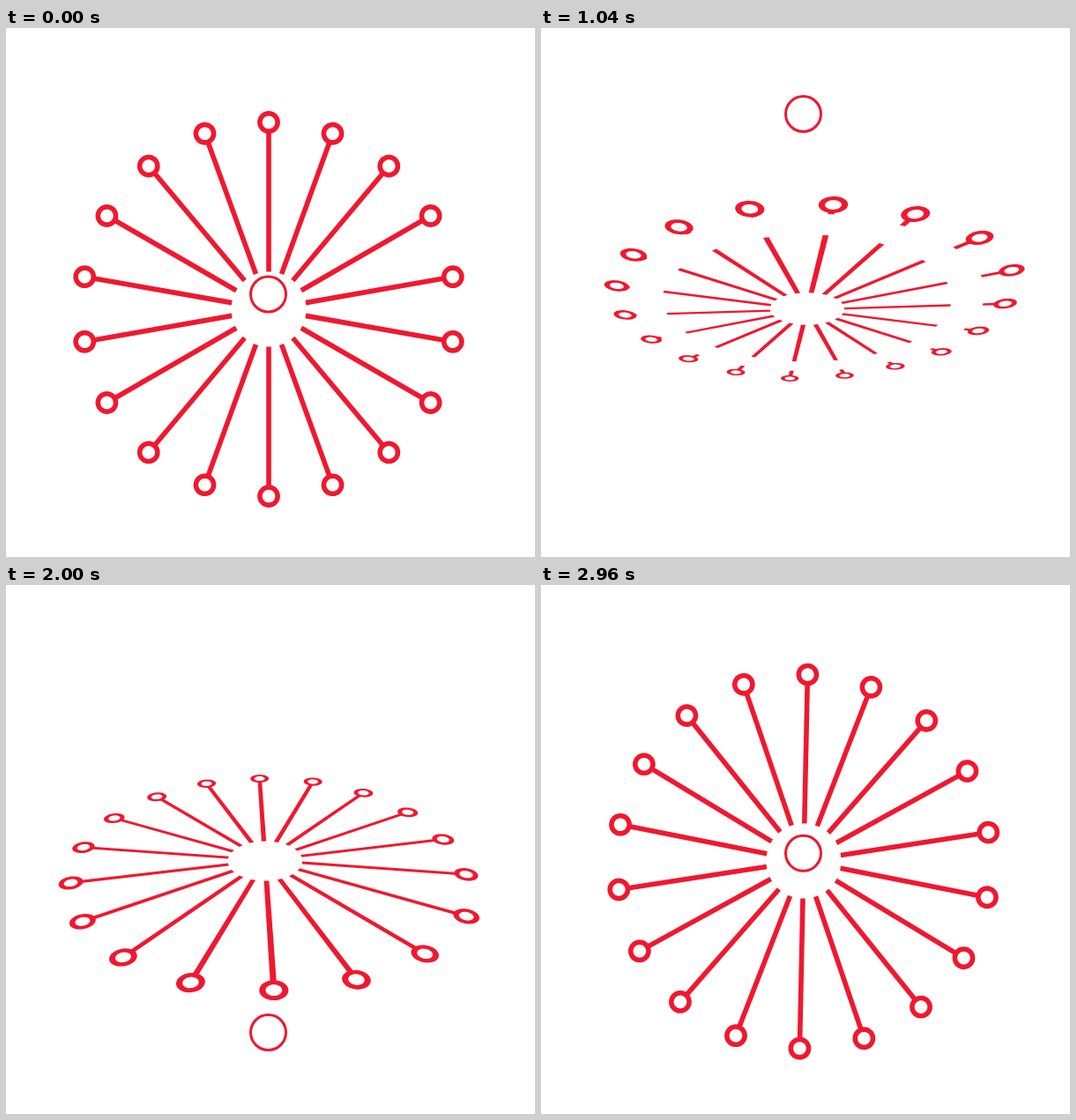
An HTML page with a canvas that plays this animation: 600 by 600 pixels, repeating every 3 s.

```html
<!DOCTYPE html>
<html lang="en">
<head>
<meta charset="utf-8">
<title>Spinning wheel</title>
<style>
  html, body { margin: 0; width: 100%; height: 100%; overflow: hidden; background: #fff; }
  canvas { display: block; width: 600px; height: 600px; }
</style>
</head>
<body>
<canvas id="stage" width="600" height="600"></canvas>
<script>
const ctx = document.getElementById('stage').getContext('2d');
const RED = '#f0182f';
const LOOP = 3000, STEP = 40, TURN = 2970;
const NODES = 18, HUB = 42.5, RIM = 212, LINE = 5.6;
const DEPTH = 800;

// time, height of the ball
const BALL = [[0, 302], [740, 94.5], [1040, 97.5], [1120, 97.5],
              [1828, 509.5], [2200, 505], [2470, 505], [2993, 302], [3000, 302]];

const clamp = x => Math.min(1, Math.max(0, x));
const smooth = p => p * p * (3 - 2 * p);

function ballY(t) {
  const i = BALL.findIndex(key => key[0] > t);
  const [t0, y0] = BALL[i - 1], [t1, y1] = BALL[i];
  return y0 + (y1 - y0) * smooth((t - t0) / (t1 - t0));
}

// Outward pulse that travels both ways round the rim from the first node,
// leaving a small swell that fades late in the loop
function pulse(k, t) {
  const age = t - Math.min(k, NODES - k) * 167;
  const peak = 19 * clamp(1 - Math.abs(age - 500) / 500);
  const swell = 5.5 * clamp((2750 - t) / 1050);
  return age > 500 ? Math.max(peak, swell) : peak;
}

// Maps a point of the tilted wheel to the stage
function projector(t) {
  const tilt = Math.PI * t / TURN, spin = 2 * tilt;
  const c = Math.cos(tilt), s = Math.sin(tilt);
  const cx = 298 + 4.7 * Math.sin(spin);
  const cy = 6 - 3 * Math.cos(spin);
  return (u, v) => {
    v += cy;
    const k = 1 / (1 + v * s / DEPTH);
    return [300 + (cx + u - 300) * k, 300 + (16 + v * c) * k];
  };
}

function trace(points) {
  points.forEach(([x, y], i) => i ? ctx.lineTo(x, y) : ctx.moveTo(x, y));
  ctx.closePath();
}

function drawBar(at, from, to) {
  if (to <= from) return;
  const h = LINE / 2;
  ctx.beginPath();
  trace([at(from, -h), at(to, -h), at(to, h), at(from, h)]);
  ctx.fill();
}

function drawRing(at, r) {
  ctx.beginPath();
  for (const size of [12.9, 7.3]) {
    trace(Array.from({ length: 40 }, (_, i) => {
      const a = i * Math.PI / 20;
      return at(r + size * Math.cos(a), size * Math.sin(a));
    }));
  }
  ctx.fill('evenodd');
}

function draw(t) {
  ctx.fillStyle = '#fff';
  ctx.fillRect(0, 0, 600, 600);
  ctx.fillStyle = ctx.strokeStyle = RED;

  const project = projector(t);
  const tail = HUB + 0.15 * t;
  const head = HUB + 0.272 * (t - 599);

  for (let k = 0; k < NODES; k++) {
    const a = 2 * Math.PI * (t / TURN + k / NODES);
    const sin = Math.sin(a), cos = Math.cos(a);
    // r runs outward, w across the spoke
    const at = (r, w) => project(r * sin + w * cos, w * sin - r * cos);
    const r = RIM + pulse(k, t), end = r - 9;
    drawBar(at, tail, end);
    drawBar(at, HUB, Math.min(head, end));
    drawRing(at, r);
  }

  ctx.beginPath();
  ctx.arc(297.5, ballY(t), 20, 0, 2 * Math.PI);
  ctx.fillStyle = '#fff';
  ctx.fill();
  ctx.lineWidth = 3;
  ctx.stroke();
}

const start = performance.now();
function tick() {
  const t = (performance.now() - start) % LOOP;
  draw(Math.floor(t / STEP) * STEP);
  requestAnimationFrame(tick);
}
tick();
</script>
</body>
</html>
```
